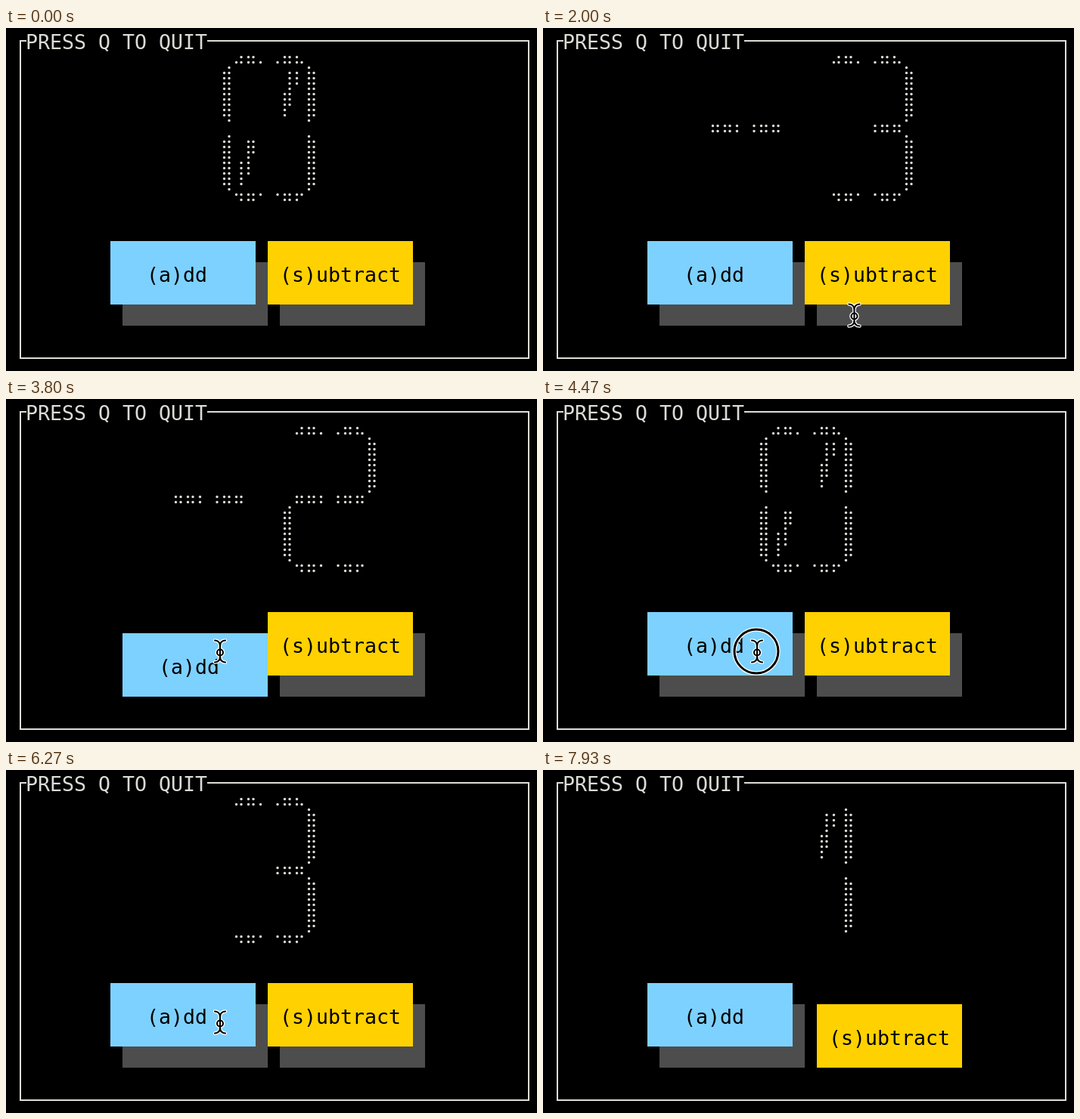
An HTML page that plays this animation: 702x454 px, repeating every 8 s.

```html
<!DOCTYPE html>
<html lang="en">
<head>
<meta charset="utf-8">
<title>Counter</title>
<style>
  html, body { margin: 0; width: 100%; height: 100%; overflow: hidden; background: #000; }
  svg { display: block; width: 100%; height: 100%; }
  text { font: 26.58px "DejaVu Sans Mono", monospace; white-space: pre; }
  .line { fill: none; stroke: #deded8; stroke-width: 2; }
  .shadow { fill: #4d4d4d; }
  #digits { fill: none; stroke: #dcdcd6; stroke-width: 3.5; stroke-linecap: round; }
  #cursor { fill: none; stroke-linecap: round; stroke-linejoin: round; }
</style>
</head>
<body>
<svg viewBox="0 0 702 454">
  <defs>
    <path id="beam" d="M276 319.5Q283 320 283 327V341Q283 348 276 348.5M290 319.5Q283 320 283 327M283 341Q283 348 290 348.5"/>
    <circle id="eye" cx="283" cy="335.5" r="4"/>
    <circle id="halo" cx="282" cy="334" r="29"/>
  </defs>
  <path class="line" d="M27 17H19V437H691V17H266"/>
  <text x="26" y="28" fill="#dcdcd6">PRESS Q TO QUIT</text>
  <path id="digits"/>
  <rect class="shadow" x="154" y="310" width="192" height="84"/>
  <rect class="shadow" x="362" y="310" width="192" height="84"/>
  <g id="add">
    <rect x="138" y="282" width="192" height="84" fill="#7dd1ff"/>
    <text x="186" y="336">(a)dd</text>
  </g>
  <g id="sub">
    <rect x="346" y="282" width="192" height="84" fill="#ffd100"/>
    <text x="362" y="336">(s)ubtract</text>
  </g>
  <g id="cursor">
    <g id="ring">
      <use href="#halo" stroke="#fff" stroke-width="5.4"/>
      <use href="#halo" stroke="#000" stroke-width="3"/>
    </g>
    <g stroke="#fff" stroke-width="4.6"><use href="#beam"/><use href="#eye"/></g>
    <g stroke="#000" stroke-width="2.1"><use href="#beam"/><use href="#eye"/></g>
  </g>
</svg>
<script>
const LOOP = 8000, FPS = 15, HOLD = 5;
const $ = id => document.getElementById(id);

// Ticks at which each button goes down; the count changes when it comes up.
const presses = [
  ...[9, 15, 21].map(at => ({ at, by: -1, mouse: true })),
  ...[50, 56, 62, 68, 74, 80].map(at => ({ at, by: 1, mouse: true })),
  ...[105, 111, 117].map(at => ({ at, by: -1, mouse: false })),
];

// Pointer stops: tick, x, y
const path = [
  [0, 486, 474], [7, 449, 334], [27, 449, 334], [33, 372, 426],
  [39, 372, 426], [41, 352, 436], [47, 282, 334], [120, 282, 334],
];
const HIDE = 105;

// Segments on a 16-column grid of braille dots
const span = (a, b) => Array.from({ length: b - a + 1 }, (_, i) => a + i);
const row = (y, a, b) => span(a, b).map(x => [x, y]);
const col = (x, a, b) => span(a, b).map(y => [x, y]);
const bar = (inner, outer, y) => [...col(inner, y, y + 10), ...col(outer, y + 1, y + 9)];
const slash = (x, y) => [
  ...col(x + 2, y, y + 2), ...col(x + 1, y, y + 6), ...col(x, y + 4, y + 8),
];
const seg = {
  top: [...row(2, 2, 6), ...row(1, 3, 5), ...row(2, 9, 13), ...row(1, 10, 12)],
  bottom: [...row(27, 2, 6), ...row(28, 3, 5), ...row(27, 9, 13), ...row(28, 10, 12)],
  midL: [...row(14, 2, 6), ...row(15, 2, 6)],
  midR: [...row(14, 9, 13), ...row(15, 9, 13)],
  upL: bar(1, 0, 3), loL: bar(1, 0, 16),
  upR: bar(14, 15, 3), loR: bar(14, 15, 16),
  diagUp: slash(10, 4), diagLo: slash(3, 17),
};
// The lower slash leans on the next cell pair
const glyphs = {
  "0": "top bottom upL loL upR loR diagUp diagLo",
  "1": "upR loR diagUp",
  "2": "top upR midL midR loL bottom",
  "3": "top upR midR loR bottom",
  "-": "midL midR",
};

function drawNumber(n) {
  const chars = [...String(n)];
  const left = 346 - (chars.length * 160 - 32) / 2;
  return chars.map((c, i) => glyphs[c].split(" ").flatMap(s => seg[s]).map(([x, y]) => {
    const px = left + i * 160 + 16 * (x >> 1) + (x % 2 ? 13 : 6.5);
    return `M${px} ${31.5 + 7 * y}h.01`;
  }).join("")).join("");
}

function pointer(tick) {
  const i = Math.max(1, path.findIndex(p => p[0] >= tick));
  const [t0, x0, y0] = path[i - 1], [t1, x1, y1] = path[i];
  const u = (tick - t0) / (t1 - t0), e = u * u * (3 - 2 * u);
  return [x0 + (x1 - x0) * e, y0 + (y1 - y0) * e];
}

let shown = null;
function render(ms) {
  const tick = Math.floor((ms + 4) * FPS / 1000);
  const down = presses.find(p => tick >= p.at && tick < p.at + HOLD);
  const count = presses.reduce((n, p) => tick >= p.at + HOLD ? n + p.by : n, 0);
  if (count !== shown) $("digits").setAttribute("d", drawNumber(shown = count));

  const shift = on => on ? "translate(16 28)" : "translate(0 0)";
  $("add").setAttribute("transform", shift(down && down.by > 0));
  $("sub").setAttribute("transform", shift(down && down.by < 0));

  const [x, y] = pointer(Math.min(tick, 120));
  $("cursor").setAttribute("transform", `translate(${x - 282} ${y - 334})`);
  $("cursor").style.display = tick > 0 && tick < HIDE ? "" : "none";
  const clicking = presses.some(p => p.mouse && tick === p.at - 1);
  $("ring").style.display = clicking ? "" : "none";
}

const start = performance.now();
function loop() {
  render((performance.now() - start) % LOOP);
  requestAnimationFrame(loop);
}
render(0);
requestAnimationFrame(loop);
</script>
</body>
</html>
```
